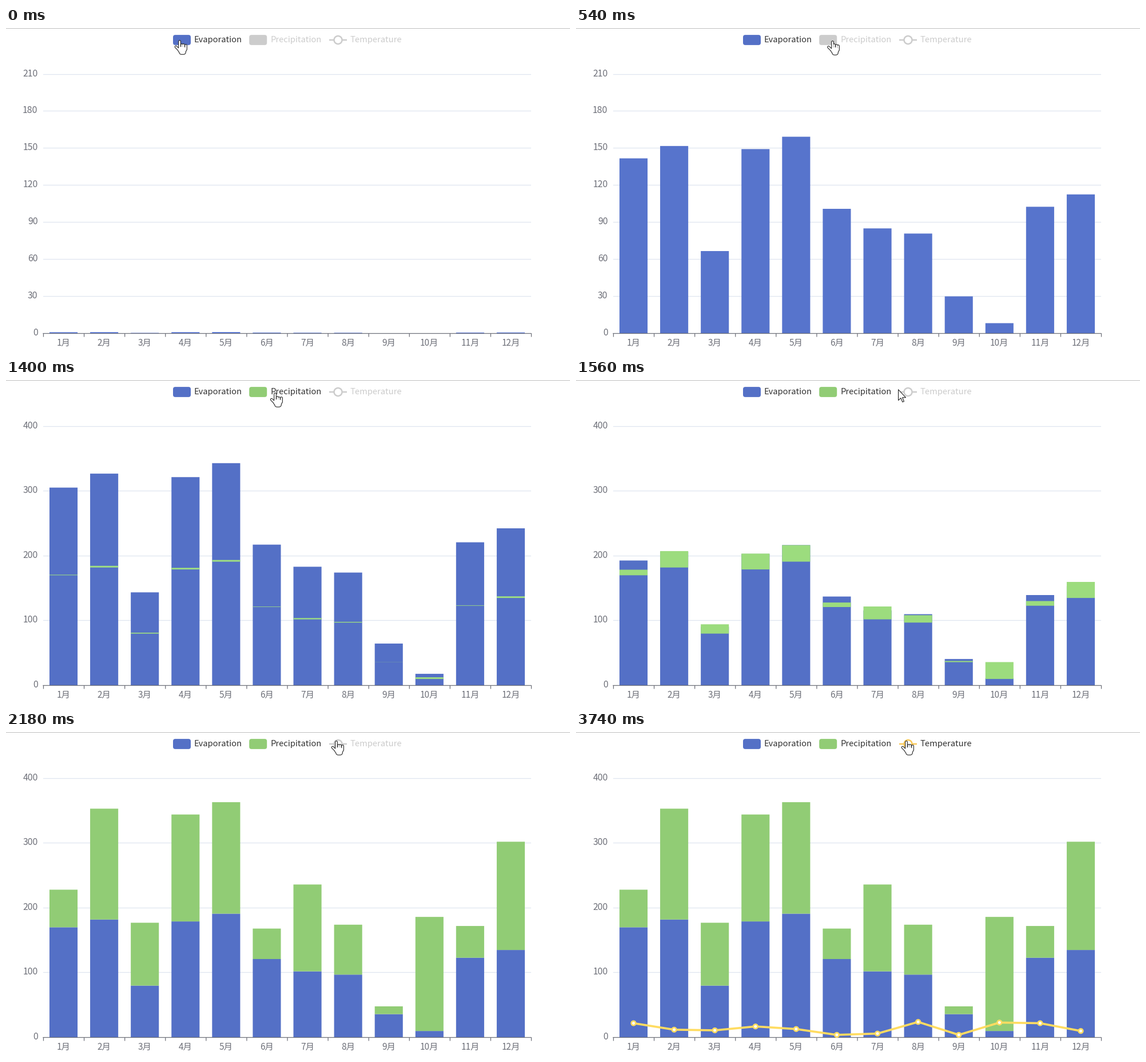
A matplotlib script for the animation above (4.84 s loop, 986 by 568 pixels).

```python
import numpy as np
import matplotlib.pyplot as plt
from matplotlib.animation import FuncAnimation
from matplotlib.collections import LineCollection
from matplotlib.colors import to_rgb
from matplotlib.patches import Circle, FancyBboxPatch, Polygon, Rectangle

W, H, DPI = 986, 568, 100
PX = 72 / DPI                      # one pixel in points
LOOP, STEP = 4840, 20

BLUE, GREEN, YELLOW = "#5470c6", "#91cc75", "#fac858"
OFF, INK, AXIS, GRID = "#cccccc", "#333333", "#6e7079", "#e0e6f1"

EVAPORATION = np.array([170, 182, 80, 179, 191, 121, 102, 97, 36, 10, 123, 135])
PRECIPITATION = np.array([58, 171, 97, 165, 172, 47, 134, 77, 12, 176, 49, 167])
TEMPERATURE = np.array([22, 12, 11, 17, 13, 4, 6, 24, 4, 23, 22, 10])

LEFT, RIGHT, TOP, BASE = 65, 918, 81, 535.5
BAND = (RIGHT - LEFT) / 12
CENTERS = LEFT + BAND * (np.arange(12) + 0.5)
BAR = 49.1

RAIN_ON, TEMP_ON = 1250, 2570      # legend clicks, ms

plt.rcParams["font.family"] = ["Noto Sans CJK JP", "DejaVu Sans"]


def ease(p):
    """Cubic in-out."""
    p = min(max(p, 0), 1)
    return 4 * p ** 3 if p < 0.5 else 1 - 4 * (1 - p) ** 3


def glide(t, start, span):
    """Smoothstep for the pointer."""
    p = min(max((t - start) / span, 0), 1)
    return p * p * (3 - 2 * p)


def height(value, top):
    return value / top * (BASE - TOP)


def lift(color):
    return np.minimum(np.array(to_rgb(color)) * 1.1, 1)


def hover_color(color, t, start, span=300):
    """Highlighted colour that fades back once the pointer has left."""
    k = min(max((t - start) / span, 0), 1)
    return tuple(lift(color) * (1 - k) + np.array(to_rgb(color)) * k)


fig = plt.figure(figsize=(W / DPI, H / DPI), dpi=DPI, facecolor="white")
ax = fig.add_axes([0, 0, 1, 1])
ax.set_xlim(0, W)
ax.set_ylim(H, 0)
ax.axis("off")


def line(xs, ys, color, width, z):
    return ax.plot(xs, ys, color=color, lw=width * PX, zorder=z, snap=False,
                   solid_capstyle="butt", solid_joinstyle="round")[0]


def label(x, y, text, color, size, ha="left"):
    return ax.text(x, y, text, color=color, fontsize=size * PX, ha=ha,
                   va="baseline", zorder=6)


def axis_value(y, value):
    return label(55.5, y + 3.3, str(value), AXIS, 15.8, "right")


def value_axis(top, step):
    parts = []
    for v in range(step, top + 1, step):
        y = np.floor(BASE - height(v, top)) + 0.5
        parts.append(line([LEFT, RIGHT], [y, y], GRID, 1.3, 1))
        parts.append(axis_value(y, v))
    return parts


def bars(color, z):
    return [ax.add_patch(Rectangle((x - BAR / 2, BASE), BAR, 0, fc=color,
                                   lw=0, zorder=z, snap=False))
            for x in CENTERS]


def swatch(x, color, w=31, h=17.8, r=4):
    return ax.add_patch(FancyBboxPatch(
        (x + r, 21 - h / 2 + r), w - 2 * r, h - 2 * r,
        boxstyle=f"round,pad={r},rounding_size={r}", fc=color, lw=0, zorder=6))


# Axes
line([0, W], [0.5, 0.5], "#bdbdbd", 1, 1)
small_axis = value_axis(210, 30)
large_axis = value_axis(400, 100)
axis_value(BASE, 0)
line([LEFT - 0.6, RIGHT + 0.6], [BASE, BASE], AXIS, 1.25, 4)
for i in range(13):
    line([LEFT + BAND * i + 0.5] * 2, [BASE, BASE + 6], AXIS, 1.25, 4)
for i, x in enumerate(CENTERS):
    label(x, 556.8, f"{i + 1}月", AXIS, 15.4, "center")

# Series
blue_bars = bars(BLUE, 2)
green_bars = bars(GREEN, 3)
temp_y = BASE - height(TEMPERATURE, 400)
temp_line = line([], [], lift(YELLOW), 3.7, 5)
dots = [ax.add_patch(Circle(c, 0, fc="white", ec=lift(YELLOW),
                            lw=2.6 * PX, zorder=5.5))
        for c in zip(CENTERS, temp_y)]

# Legend
swatch(292, BLUE)
label(329, 25.3, "Evaporation", INK, 14.7)
rain_swatch = swatch(425.2, OFF)
rain_text = label(462, 25.3, "Precipitation", OFF, 14.7)
temp_dash = line([565, 596], [21, 21], OFF, 2.5, 6)
temp_ring = ax.add_patch(Circle((580.5, 21), 7, fc="white", ec=OFF,
                                lw=2.5 * PX, zorder=6.5))
temp_text = label(602, 25.3, "Temperature", OFF, 14.7)

# Pointers, tip at the origin. The hand is built from round strokes,
# first in black, then slightly thinner in white.
fingers = [[(3.5 * k, 2 + (k > 0) * (5 + 0.7 * k)), (3.5 * k, 16)]
           for k in range(4)]
thumb, palm, wrist = [(-6, 12), (0, 18)], [(3.2, 17), (6.8, 17)], [(3, 21), (6.5, 21)]
HAND = np.array(fingers + [thumb, palm, wrist])
WIDTHS = np.array([2.6] * 5 + [10, 6.5])
ARROW = 1.18 * np.array([(0, 0), (0, 16), (3.7, 12.6), (6.2, 18.5),
                         (8.4, 17.5), (6, 11.8), (11, 11.8)])

hand = [ax.add_collection(LineCollection(
            HAND, linewidths=(WIDTHS + extra) * PX, colors=color,
            capstyle="round", zorder=z), autolim=False)
        for extra, color, z in ((2.2, "#222222", 8), (0, "white", 9))]
arrow = ax.add_patch(Polygon(ARROW, closed=True, fc="white", ec="#222222",
                             lw=1.1 * PX, joinstyle="round", zorder=9))


def draw_pointer(t):
    a, b = glide(t, 80, 373), glide(t, 1330, 300)
    sag = 3.5 * (np.sin(np.pi * a) + np.sin(np.pi * b))
    x = 303 + 144.5 * a + 129.5 * b
    y = 21 + 0.5 * a - 6.5 * b + sag
    between = 415 < x < 425 or 552 < x < 564
    for layer in hand:
        layer.set_segments(HAND + (x, y))
        layer.set_visible(not between)
    arrow.set_xy(ARROW + (x, y))
    arrow.set_visible(between)


def draw_bars(t):
    grow = ease((t + 104) / 1000)
    p = (t - RAIN_ON - 20) / 900
    shrink, rise = ease(2 * p), ease(p)
    blue = hover_color(BLUE, t, 345)
    green = hover_color(GREEN, t, 1500)
    for i in range(12):
        old = height(EVAPORATION[i], 210) * grow
        new = height(EVAPORATION[i], 400)
        h = old + (new - old) * shrink
        blue_bars[i].set(y=BASE - h, height=h, facecolor=blue)
        h = height(PRECIPITATION[i], 400) * rise
        green_bars[i].set(y=BASE - new - h, height=h, facecolor=green,
                          visible=h > 0)


def draw_temperature(t):
    p = (t - TEMP_ON + 80) / 1000
    end = min(LEFT + (RIGHT - LEFT) * ease(p), CENTERS[-1])
    keep = CENTERS < end
    tip = ([end], [np.interp(end, CENTERS, temp_y)]) if keep.any() else ([], [])
    temp_line.set_data(np.append(CENTERS[keep], tip[0]),
                       np.append(temp_y[keep], tip[1]))
    for x, dot in zip(CENTERS, dots):
        delay = (x - LEFT) / (RIGHT - LEFT) + 0.08
        s = min(max((p - delay) / 0.2, 0), 1)
        dot.set_radius(3.8 * s)
        dot.set_visible(s > 0)


def draw_legend(t):
    rain, temp = t >= RAIN_ON, t >= TEMP_ON
    rain_swatch.set_facecolor(GREEN if rain else OFF)
    rain_text.set_color(INK if rain else OFF)
    temp_dash.set_color(YELLOW if temp else OFF)
    temp_ring.set_edgecolor(YELLOW if temp else OFF)
    temp_text.set_color(INK if temp else OFF)
    for part in small_axis:
        part.set_visible(not rain)
    for part in large_axis:
        part.set_visible(rain)


def update(i):
    t = i * STEP + STEP / 2
    draw_legend(t)
    draw_bars(t)
    draw_temperature(t)
    draw_pointer(t)
    return []


anim = FuncAnimation(fig, update, frames=LOOP // STEP, interval=STEP,
                     init_func=lambda: update(0), repeat=True,
                     repeat_delay=0, blit=False)
plt.show()
```
